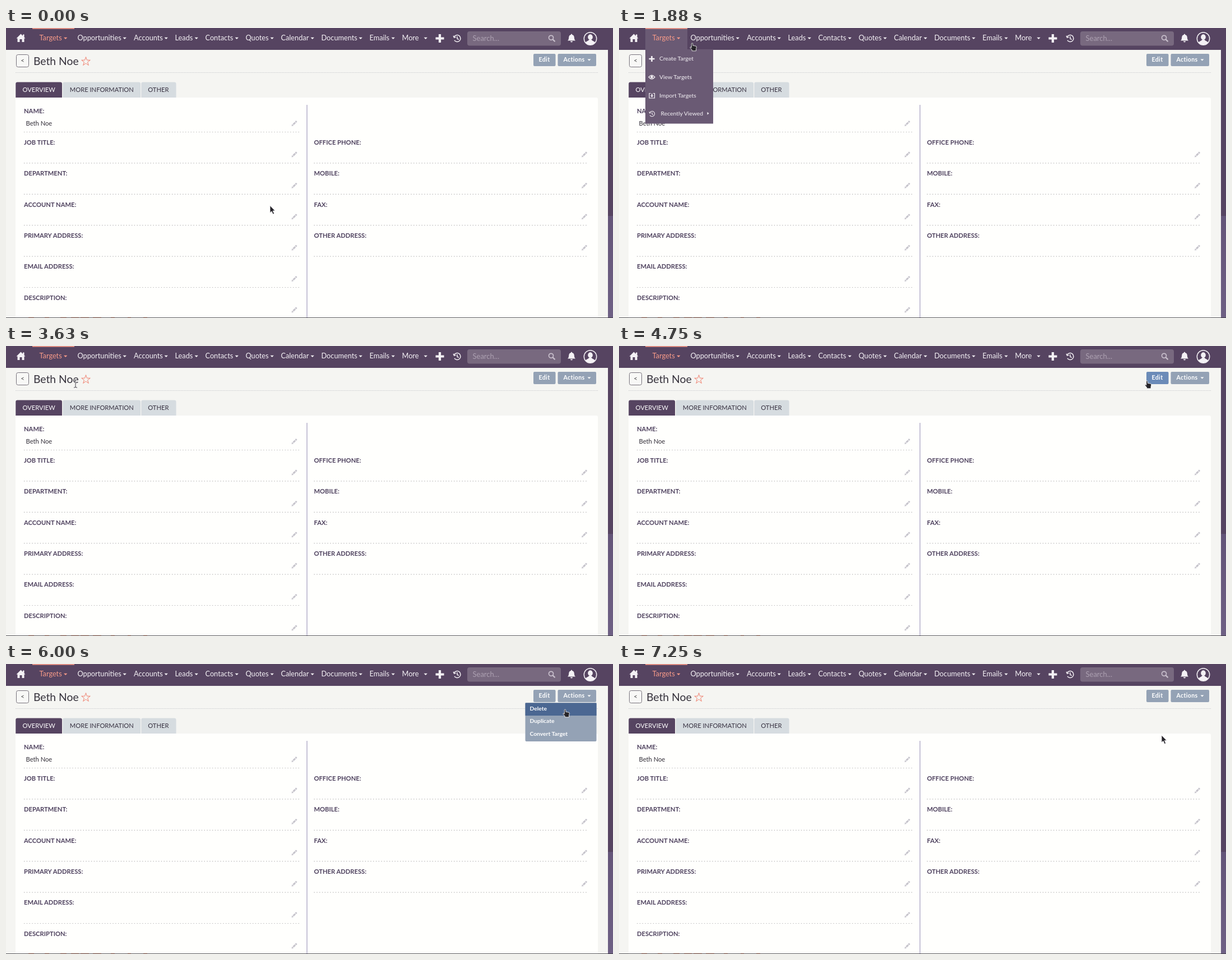
These frames come from a looping animation (1083x517 px, 8 s). An HTML page:

```html
<!DOCTYPE html>
<html lang="en">
<head>
<meta charset="utf-8">
<title>Target record</title>
<style>
html, body { margin: 0; width: 100%; height: 100%; overflow: hidden; background: #f5f5f2; }
svg { display: block; width: 1083px; height: 517px; font-family: Lato, Carlito, sans-serif; }
text { white-space: pre; }
.nav { font-size: 12.75px; fill: #f4f1f5; }
.on { fill: #f79a88; }
.label { font-size: 11.2px; font-weight: 700; fill: #4d405d; }
.tab { font-size: 11.2px; fill: #36303f; }
.item { font-size: 10.4px; fill: #f4f1f5; }
.btn { font-size: 10.6px; font-weight: 700; letter-spacing: .35px; fill: #fff; }
.act { font-size: 10.3px; font-weight: 700; fill: #fff; }
.dots { stroke: #b0afb0; stroke-width: 1.2; stroke-dasharray: 1.3 3.5; }
.line { fill: none; stroke: #f4f1f5; }
</style>
</head>
<body>
<svg id="stage" viewBox="0 0 1083 517">
  <defs>
    <linearGradient id="strip" x1="0" y1="0" x2="0" y2="1">
      <stop offset="0" stop-color="#645578"/><stop offset="1" stop-color="#6e6084"/>
    </linearGradient>
    <g id="pencil" fill="none" stroke="#c6c4cc">
      <path d="M-4 4L4-4" stroke-width="3" stroke-dasharray="2 .8 5 .8 3"/>
      <path d="M-5 5L-3.5 3.5"/>
    </g>
    <g id="history" fill="none">
      <path d="M-5.2-3A6 6 0 1 1-5 3.4M-6.8-4.6L-5.4-1.4-2.2-2.4M0-3.4V.6L2.8 2"/>
    </g>
  </defs>

  <rect width="1083" height="517" fill="#f5f5f2"/>
  <rect x="1074" width="9" height="336" fill="#564461"/>
  <rect x="1074" y="335" width="9" height="182" fill="url(#strip)"/>

  <g id="page">
    <rect x="18.5" y="47.5" width="22" height="22" rx="3" fill="#f8f8f6" stroke="#77727c"/>
    <text x="26.2" y="62" font-size="11.5" fill="#444">&lt;</text>
    <text x="49" y="65.6" font-size="19.3" fill="#35313b">Beth Noe</text>
    <path id="star" fill="none" stroke="#f0806e"/>
    <path d="M17 79.5H1056" stroke="#cfd0d2" stroke-dasharray="1.5 1"/>
    <path d="M17 124H1053a3 3 0 0 1 3 3V517H17Z" fill="#fffffd"/>
    <path d="M17.3 124V99.500a3 3 0 0 1 3-3H97a3 3 0 0 1 3 3V124Z" fill="#564461"/>
    <path d="M101.300 124V99.500a3 3 0 0 1 3-3H237a3 3 0 0 1 3 3V124ZM241.300 124V99.500a3 3 0 0 1 3-3H300.500a3 3 0 0 1 3 3V124Z" fill="#d6dce0"/>
    <text class="tab" x="29.5" y="113.8" style="fill:#fff">OVERVIEW</text>
    <text class="tab" x="113.800" y="113.800">MORE INFORMATION</text>
    <text class="tab" x="253.200" y="113.800">OTHER</text>
    <path d="M537 137V517" stroke="#b9b5cd" stroke-width="1.6"/>
    <text x="35.500" y="174" font-size="11.200" fill="#2f2b35">Beth Noe</text>
  </g>

  <path d="M40 516H50M69 516H77M97 516H108M116 516H130M133 516H148M155 516H170M187 516H194M217 516H223M245 516H252" stroke="#f58a62" stroke-width=".8"/>
  <path d="M0 516.500H1083" stroke="#3d3b40" stroke-opacity=".85"/>

  <rect id="edit" x="941" y="46" width="39.500" height="22" rx="2"/>
  <text class="btn" x="950.500" y="60">Edit</text>
  <rect id="actions" x="984.500" y="46" width="68.500" height="22" rx="2"/>
  <text class="btn" x="994.500" y="60">Actions</text>
  <path d="M1037.500 55.500h6l-3 3z" fill="#fff"/>

  <rect width="1083" height="39" fill="#564461"/>
  <g id="bar">
    <rect id="targetTab" x="47" width="75" height="39" fill="#6a5a74"/>
    <rect x="47" width="75" height="1.600" fill="#f79a88"/>
    <path d="M18.500 18.500L26.500 10.500 30 14V11.500H32.500V16.500L34.500 18.500H32.500V25H28.500V20H24.500V25H20.500V18.500Z" fill="#f4f1f5"/>
    <path d="M774 11V26M766.500 18.500H781.500" class="line" stroke-width="4.200"/>
    <use href="#history" x="805" y="18.500" class="line" stroke-width="1.500"/>
    <rect x="823" y="6" width="167" height="25.500" rx="4" fill="#78697f"/>
    <text x="832.500" y="22.500" font-size="13" fill="#ada1b2">Search...</text>
    <circle cx="972.500" cy="17.300" r="4" class="line" style="stroke:#c9c0cd" stroke-width="1.700"/>
    <path d="M975.500 20.300L979.500 24.300" stroke="#c9c0cd" stroke-width="2.300"/>
    <path d="M1002 22.500C1004 21 1004 18.500 1004.300 16A4.700 4.700 0 0 1 1008 12V10.800H1010V12A4.700 4.700 0 0 1 1013.700 16C1014 18.500 1014 21 1016 22.500ZM1007 23.500H1011A2 2 0 0 1 1007 23.500Z" fill="#f4f1f5"/>
    <circle cx="1042.500" cy="19" r="11.200" class="line" stroke-width="1.500"/>
    <ellipse cx="1042.500" cy="16.300" rx="4.300" ry="5" fill="#f4f1f5"/>
    <path d="M1034 25.800C1035.500 23 1039.500 23.200 1040 21H1045C1045.500 23.200 1049.500 23 1051 25.800A10.500 10.500 0 0 1 1034 25.800Z" fill="#f4f1f5"/>
  </g>

  <g id="targetMenu">
    <rect x="47" y="38" width="121" height="132.500" fill="#6a5a74"/>
    <path d="M58.500 50V60M53.500 55H63.500" class="line" stroke-width="2.600"/>
    <path d="M53 87.500Q58.500 80.800 64 87.500 58.500 94.200 53 87.500Z" class="line" stroke-width="1.200"/>
    <circle cx="58.500" cy="87.300" r="2.200" fill="#f4f1f5"/>
    <path d="M56.500 116.500H54V125H63.500V116.500H61" class="line" stroke-width="1.200"/>
    <path d="M58.700 117V121" class="line" stroke-width="1.600"/>
    <path d="M56 120.300H61.400L58.700 123.400Z" fill="#f4f1f5"/>
    <use href="#history" transform="translate(59 153) scale(.78)" class="line" stroke-width="1.300"/>
    <path d="M157.500 149.700V154.700L160.500 152.200Z" fill="#f4f1f5"/>
    <text class="item" x="72" y="58.200">Create Target</text>
    <text class="item" x="72" y="90.700">View Targets</text>
    <text class="item" x="72" y="123.700">Import Targets</text>
    <text class="item" x="74.500" y="156.200">Recently Viewed</text>
  </g>

  <g id="actionMenu">
    <rect x="926.500" y="69" width="127" height="69" rx="2" fill="#94a2b5"/>
    <rect id="hover" x="926.500" width="127" height="22.500" fill="#4b6792"/>
    <text class="act" x="934.500" y="82.500">Delete</text>
    <text class="act" x="934.500" y="105">Duplicate</text>
    <text class="act" x="934.500" y="127.700">Convert Target</text>
  </g>

  <g id="cursor" stroke-linejoin="round">
    <path id="arrow" d="M0 0V13L3 10.300 5.300 15.500 7.600 14.500 5.300 9.400H9.200Z" fill="#262429" stroke="#fff" stroke-width=".8"/>
    <path id="hand" d="M-1.700 1.200Q-1.700 0 -.5 0T.8 1.200V4.300L6 5.200Q7.500 5.600 7.300 7L6.500 11V13.800H-.8V12L-4 8.200Q-4.300 6.700-3 6.800L-1.700 8Z" fill="#262429" stroke="#fff" stroke-width=".8"/>
    <g id="beam" fill="none">
      <path d="M-3-7H-1L0-6 1-7H3M0-6V6M-3 7H-1L0 6 1 7H3" stroke="#fff" stroke-width="2.400"/>
      <path d="M-3-7H-1L0-6 1-7H3M0-6V6M-3 7H-1L0 6 1 7H3" stroke="#37343a"/>
    </g>
  </g>
</svg>
<script>
const $ = id => document.getElementById(id);

function add(parent, tag, attrs, label) {
  const el = document.createElementNS('http://www.w3.org/2000/svg', tag);
  for (const key in attrs) el.setAttribute(key, attrs[key]);
  if (label) el.textContent = label;
  return parent.appendChild(el);
}

// Navigation: label, text x, caret x
[['Targets', 59.5, 103], ['Opportunities', 127.5, 208.5], ['Accounts', 228, 282.5],
 ['Leads', 301.5, 336.5], ['Contacts', 355.5, 408.5], ['Quotes', 427.5, 471.5],
 ['Calendar', 490.5, 543.5], ['Documents', 562.5, 629.5], ['Emails', 648.5, 687.5],
 ['More', 706.5, 745.5]].forEach(([name, x, caret], i) => {
  const cls = i ? 'nav' : 'nav on';
  add($('bar'), 'text', { x, y: 22.4, class: cls }, name);
  add($('bar'), 'path', { d: `M${caret} 16.700h6.400l-3.200 3.300z`, class: cls });
});

// Detail fields in two columns
const PITCH = 55.4;
function field(name, x, row, end, pencil) {
  const y = row * PITCH;
  add($('page'), 'text', { x, y: 152.3 + y, class: 'label' }, name);
  add($('page'), 'use', { href: '#pencil', x: pencil, y: 170 + y });
  add($('page'), 'path', { d: `M${x} ${185.5 + y}H${end}`, class: 'dots' });
}
['NAME:', 'JOB TITLE:', 'DEPARTMENT:', 'ACCOUNT NAME:', 'PRIMARY ADDRESS:', 'EMAIL ADDRESS:', 'DESCRIPTION:']
  .forEach((name, i) => field(name, 32, i, 524, 514.5));
['OFFICE PHONE:', 'MOBILE:', 'FAX:', 'OTHER ADDRESS:']
  .forEach((name, i) => field(name, 549.5, i + 1, 1038, 1032));

const points = Array.from({ length: 10 }, (_, i) => {
  const a = i * Math.PI / 5, r = i % 2 ? 3.2 : 8.2;
  return `${142.5 + r * Math.sin(a)} ${59.8 - r * Math.cos(a)}`;
});
$('star').setAttribute('d', `M${points.join('L')}Z`);

// Pointer path: start time, x, y, shape
const steps = [
  [0, 471, 316.5, 'arrow'], [130, 455, 301, 'arrow'], [250, 393, 245, 'arrow'],
  [380, 300, 167, 'arrow'], [500, 203, 88, 'arrow'], [630, 119, 32, 'hand'],
  [750, 99, 19, 'hand'], [880, 105, 16, 'hand'], [1000, 110, 29, 'hand'],
  [1130, 119, 41, 'hand'], [1880, 131, 27, 'hand'], [2000, 285, 79, 'arrow'],
  [2130, 391, 111, 'arrow'], [2500, 374, 109, 'arrow'], [2630, 318, 102, 'arrow'],
  [2750, 240, 91, 'arrow'], [2880, 160, 78, 'arrow'], [3000, 97, 67, 'beam'],
  [3130, 57, 62, 'beam'], [3250, 73, 65, 'beam'], [3380, 88, 67, 'beam'],
  [3500, 109, 68, 'beam'], [3630, 124, 67, 'beam'], [3750, 178, 81, 'arrow'],
  [3880, 340, 116, 'arrow'], [4000, 560, 132, 'arrow'], [4130, 739, 116, 'arrow'],
  [4250, 778, 107, 'arrow'], [4380, 835, 91, 'arrow'], [4500, 889, 77, 'arrow'],
  [4630, 926, 69, 'arrow'], [4750, 942.5, 62, 'hand'], [4880, 965, 56, 'hand'],
  [5000, 979, 56, 'hand'], [5130, 993, 56, 'hand'], [5250, 998, 57, 'hand'],
  [5880, 999, 71, 'hand'], [6000, 998, 81, 'hand'], [6130, 988, 99, 'hand'],
  [6250, 976, 116, 'hand'], [6380, 968, 126, 'hand'], [7250, 968, 127, 'arrow']
];

const within = (t, from, to) => t >= from && t < to;
const show = (id, on) => $(id).setAttribute('visibility', on ? 'visible' : 'hidden');
const button = (id, hot) => $(id).setAttribute('fill', hot ? '#6b8bb8' : '#94a2b5');

function draw(t) {
  const [, x, y, shape] = steps.findLast(s => s[0] <= t);
  $('cursor').setAttribute('transform', `translate(${x} ${y})`);
  for (const id of ['arrow', 'hand', 'beam']) show(id, id === shape);

  const open = within(t, 630, 2000);
  show('targetTab', open);
  show('targetMenu', open);
  button('edit', within(t, 4750, 5130));
  button('actions', within(t, 5130, 5880));
  show('actionMenu', within(t, 5500, 7250));
  show('hover', within(t, 5880, 7250));
  $('hover').setAttribute('y', t < 6130 ? 69.5 : t < 6250 ? 92 : 115);
}

function tick() {
  draw(performance.now() % 8000);
  requestAnimationFrame(tick);
}
tick();
</script>
</body>
</html>
```
